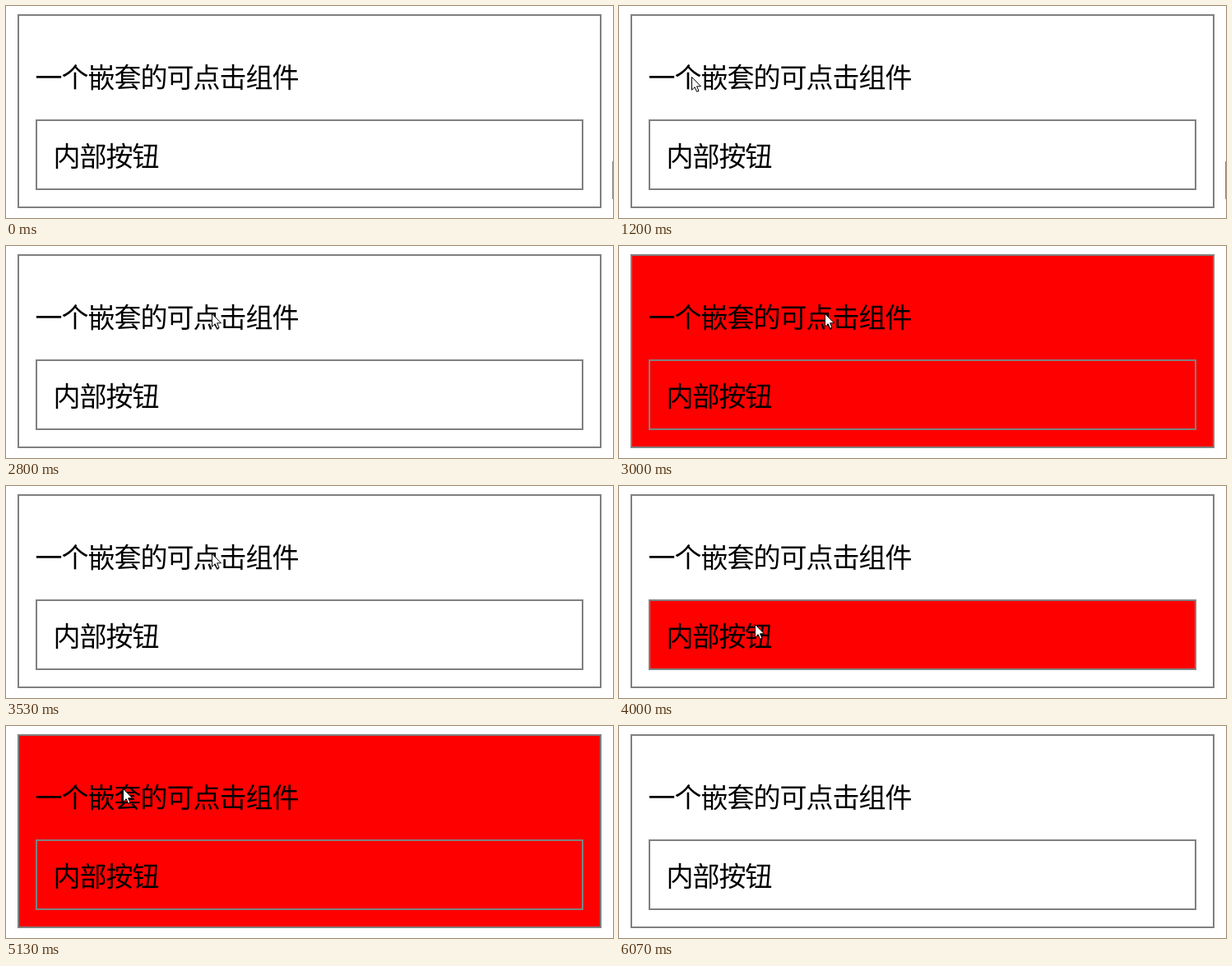
Animation, 738 px wide and 258 px high, one loop 6590 ms. Source, as an HTML page:

```html
<!DOCTYPE html>
<html lang="zh-CN">
<head>
<meta charset="utf-8">
<title>嵌套点击</title>
<style>
  html, body { margin: 0; width: 100%; height: 100%; overflow: hidden; background: #fff; }
  svg { display: block; width: 738px; height: 258px; }
  text { font: 33px "Noto Sans CJK SC", "Noto Sans CJK", "Noto Sans", sans-serif; letter-spacing: -1px; fill: #000; }
  .box { stroke: #808080; stroke-width: 2; }
</style>
</head>
<body>
<svg viewBox="0 0 738 258">
  <rect id="outer" class="box" x="15" y="11" width="708" height="234"/>
  <text x="35.5" y="99.4">一个嵌套的可点击组件</text>
  <rect id="inner" class="box" x="37" y="139" width="664" height="84"/>
  <text x="57.5" y="195.4">内部按钮</text>
  <path id="edge" d="M737.5 189V235" stroke="#8a8a8a" fill="none"/>
  <path id="cursor" d="M.5 .5V16.2L4.2 12.7L6.6 18.3L9 17.3L6.6 11.8H11.5Z" fill="#fff" stroke="#000"/>
</svg>
<script>
const LOOP = 6590, RATE = 15 / 1000;
const $ = id => document.getElementById(id);
const outer = $('outer'), inner = $('inner'), edge = $('edge'), cursor = $('cursor');

// Places where the pointer rests, and the ends of its route.
const enter = [738, 165], button = [270, 163], title = [250, 82];
const button2 = [165, 168], title2 = [142, 76], leave = [112, 260];

const mid = (a, b) => a.map((v, i) => (v + b[i]) / 2);
const move = (start, end, from, to, via = mid(from, to)) => ({ start, end, from, to, via });
const moves = [
  move(730, 1467, enter, button, [-265, -22]),
  move(2400, 2800, button, title),
  move(3530, 3867, title, button2),
  move(4400, 4733, button2, title2),
  move(5800, 6067, title2, leave)
];

const clamp = u => Math.min(1, Math.max(0, u));
const smooth = u => u * u * (3 - 2 * u);
const between = (t, a, b) => t >= a && t < b;
const show = (el, on) => el.setAttribute('visibility', on ? 'visible' : 'hidden');
const light = (el, on, off) => el.setAttribute('fill', on ? '#f00' : off);

function pointerAt(t) {
  const { start, end, from, to, via } = moves.findLast(m => t >= m.start) || moves[0];
  const u = smooth(clamp((t - start) / (end - start))), v = 1 - u;
  return from.map((p, i) => Math.round(v * v * p + 2 * u * v * via[i] + u * u * to[i]));
}

function draw(t) {
  light(inner, between(t, 1930, 2470) || between(t, 4000, 4470), 'none');
  light(outer, between(t, 3000, 3530) || between(t, 5130, 5730), '#fff');
  show(edge, t < 1930);

  // The pointer advances in 15 Hz steps.
  const step = Math.floor((t + 7) * RATE) / RATE;
  show(cursor, between(step, 790, 6060));
  cursor.setAttribute('transform', `translate(${pointerAt(step)})`);
}

const start = performance.now();
function tick() {
  draw((performance.now() - start) % LOOP);
  requestAnimationFrame(tick);
}
tick();
</script>
</body>
</html>
```
